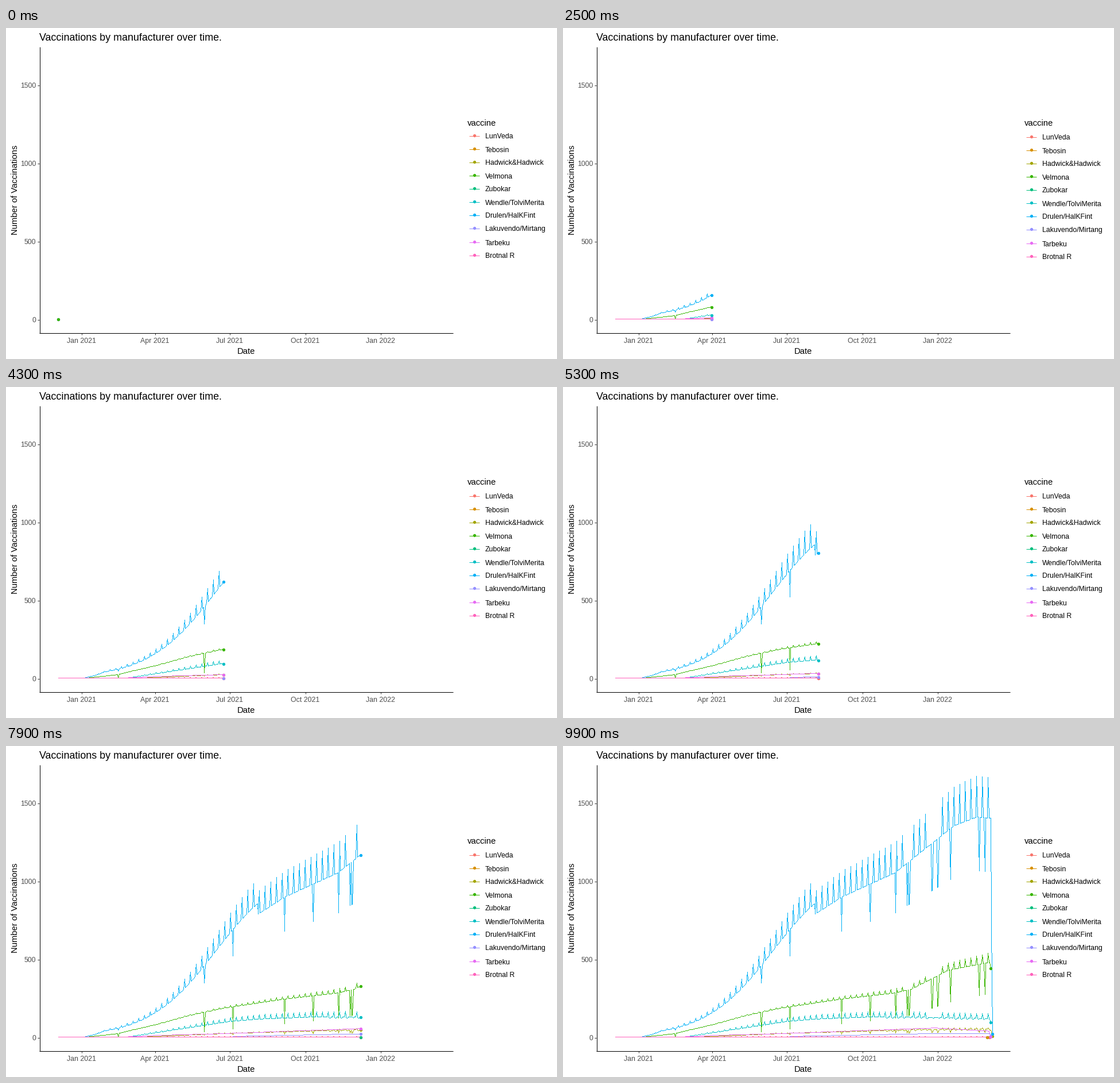
Write a matplotlib script that moves like this. It is 960 by 576 pixels and loops after 10 s.

```python
import matplotlib.pyplot as plt
import numpy as np
from matplotlib.animation import FuncAnimation

W, H, DPI = 960, 576, 96
PX = 72 / DPI
FRAMES, LAST_DAY = 100, 460
HIDDEN = (-50, -50)

plt.rcParams["font.family"] = ["Liberation Sans", "DejaVu Sans"]

# Legend order: name and colour
VACCINES = [
    ("LunVeda", "#F8766D"),
    ("Tebosin", "#D89000"),
    ("Hadwick&Hadwick", "#A3A500"),
    ("Velmona", "#39B600"),
    ("Zubokar", "#00BF7D"),
    ("Wendle/TolviMerita", "#00BFC4"),
    ("Drulen/HalKFint", "#00B0F6"),
    ("Lakuvendo/Mirtang", "#9590FF"),
    ("Tarbeku", "#E76BF3"),
    ("Brotnal R", "#FF62BC"),
]
LINE_ORDER = [4, 1, 7, 0, 6, 3, 5, 2, 8, 9]
DOT_ORDER = [9, 0, 2, 7, 8, 4, 1, 5, 6, 3]

# Public holidays, on which part of the reports is missing
HOLIDAYS = [73, 178, 213, 276, 311, 342, 356, 358, 359,
            386, 387, 393, 394, 409, 444, 451]


def x_of(day):
    return 91.5 + 1.4274 * day


def y_of(value):
    return 507.5 - 0.272 * value


def centre(v):
    return np.floor(v) + 0.5


def curve(*keys):
    """Days from the first to the last key, values interpolated."""
    knots, levels = zip(*keys)
    days = np.arange(knots[0], knots[-1] + 1)
    return days, np.interp(days, knots, levels)


def with_rhythm(data, peak=0, holiday=1, weekend=1):
    """Scale Fridays up and holidays and late weekends down."""
    days, values = data
    friday = (days % 7 == 0) & (days >= 42) & ~np.isin(days + 1, HOLIDAYS)
    late = (days > 325) & np.isin(days % 7, (2, 3))
    scale = np.where(friday, 1 + peak, 1) * np.where(late, weekend, 1)
    return days, values * np.where(np.isin(days, HOLIDAYS), holiday, scale)


def leader():
    """Logistic growth, a sudden cut, then slower growth until the last days."""
    early = np.arange(244)
    growth = 1100 / (1 + np.exp((192 - early) / 41))
    growth *= np.clip((early - 30) / 25, 0, 1)
    late, rest = curve((244, 788), (277, 898), (341, 1050), (413, 1351),
                       (441, 1408), (458, 1400), (460, 22))
    return np.r_[early, late], np.r_[growth, rest]


runner_up = curve((0, 0), (34, 0), (70, 20), (118, 78), (160, 138), (202, 185),
                  (273, 241), (341, 282), (362, 308), (406, 427), (457, 479),
                  (458, 443))
t = runner_up[0]

DATA = {
    0: with_rhythm(curve((130, 1), (457, 1)), peak=2),
    1: curve((440, 0), (454, 0)),
    2: with_rhythm(curve((100, 0), (202, 22), (380, 49), (458, 50), (460, 8)),
                   peak=0.17, holiday=0.6, weekend=0.9),
    3: with_rhythm(runner_up, peak=0.00027 * t, holiday=0.21 + 0.00135 * (t - 178)),
    4: curve((255, 0), (454, 0)),
    5: with_rhythm(curve((84, 0), (210, 100), (245, 115), (310, 128),
                         (350, 130), (457, 118), (458, 100)),
                   peak=0.26, weekend=0.94),
    6: with_rhythm(leader(), peak=0.185, holiday=0.755),
    7: curve((100, 0), (212, 0), (214, 4), (385, 22), (457, 21), (458, 8)),
    8: curve((34, 0), (90, 2), (118, 10), (202, 22), (390, 58), (456, 38), (458, 5)),
    9: curve((0, 0), (457, 1)),
}


def raster(days, values):
    """Pixels of a hard-edged polyline, and how many are used up to each day."""
    px, py = np.floor(x_of(days)), np.floor(y_of(values))
    steps = np.maximum(abs(np.diff(px)), abs(np.diff(py))).astype(int)
    counts = np.r_[1, 1 + np.cumsum(steps)]
    i = np.arange(counts[-1])
    xs, ys = (np.rint(np.interp(i, counts - 1, p)) for p in (px, py))
    return xs, ys, counts


fig = plt.figure(figsize=(W / DPI, H / DPI), dpi=DPI, facecolor="white")
ax = fig.add_axes([0, 0, 1, 1])
ax.set(xlim=(0, W), ylim=(H, 0))
ax.axis("off")


def rule(xs, ys, color="black"):
    ax.plot(xs, ys, color=color, lw=PX, solid_capstyle="butt")


def label(x, y, text, size, color="black", **kw):
    return ax.text(x, y, text, fontsize=size * PX, color=color,
                   va="baseline", **kw)


def dots(colors):
    spots = np.full((len(colors), 2), HIDDEN[0])
    return ax.scatter(*spots.T, s=(5.3 * PX) ** 2, c=colors, linewidths=0, zorder=3)


# Axes
for value in (0, 500, 1000, 1500):
    y = centre(y_of(value))
    rule([55, 58], [y, y], "#333333")
    label(52, y + 5, str(value), 12.3, "#4D4D4D", ha="right")
for day, text in zip((28, 118, 209, 301, 393),
                     ("Jan 2021", "Apr 2021", "Jul 2021", "Oct 2021", "Jan 2022")):
    x = centre(x_of(day))
    rule([x, x], [531, 534], "#333333")
    label(x - 0.5, 548, text, 12.4, "#4D4D4D", ha="center")
rule([58.5, 58.5], [33, 531])
rule([58, 779], [530.5, 530.5])
label(58, 22, "Vaccinations by manufacturer over time.", 17.85)
label(418.5, 567, "Date", 14.7, ha="center")
label(20, 281.5, "Number of Vaccinations", 14.7, rotation=90,
      rotation_mode="anchor", ha="center")

# Legend
label(804, 170, "vaccine", 14.7)
rows = 189.7 + 23.04 * np.arange(len(VACCINES))
colors = [color for _, color in VACCINES]
key_lines = ax.hlines(rows, 807, 825, colors=colors, lw=PX)
key_dots = dots(colors)
key_texts = [label(835, y, name, 12.3) for y, (name, _) in zip(rows, VACCINES)]

# Data: one pixel marker per point of the line
PATHS = {i: raster(*data) for i, data in DATA.items()}
lines = {i: ax.plot([], [], ",", color=colors[i])[0] for i in LINE_ORDER}
heads = dots([colors[i] for i in DOT_ORDER])


def place_legend(shift):
    ys = centre(rows + shift)
    key_lines.set_segments([[(807, y), (825, y)] for y in ys])
    key_dots.set_offsets(np.column_stack([np.full(len(ys), 816.5), ys]))
    for text, y in zip(key_texts, ys):
        text.set_y(y + 5)


def update(n):
    today = min(LAST_DAY, int((n + 0.5) * LAST_DAY / (FRAMES - 1))) if n else 0
    place_legend(0 if n else -2)
    spots = []
    for i in DOT_ORDER:
        xs, ys, counts = PATHS[i]
        k = np.searchsorted(DATA[i][0], today, side="right")
        end = counts[k - 1] if k else 0
        lines[i].set_data(xs[:end], ys[:end])
        spots.append((xs[end - 1] + 0.5, ys[end - 1] + 0.5) if k else HIDDEN)
    heads.set_offsets(spots)
    return [*lines.values(), heads, key_lines, key_dots, *key_texts]


anim = FuncAnimation(fig, update, frames=FRAMES, interval=100,
                     init_func=lambda: update(0), repeat=True, repeat_delay=0)
plt.show()
```
